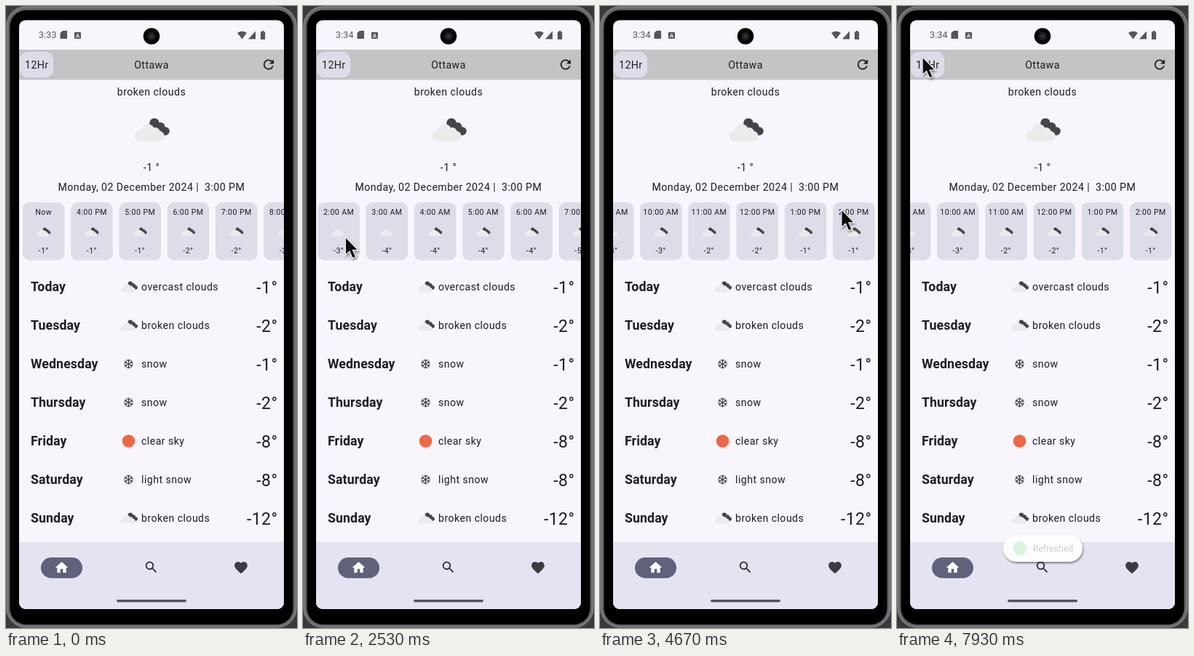
Recreate the animation shown at these times as an HTML page. Size 400 px wide and 855 px high, loop 8000 ms.

```html
<!DOCTYPE html>
<html lang="en">
<head>
<meta charset="utf-8">
<title>Weather</title>
<style>
html, body { margin: 0; width: 100%; height: 100%; overflow: hidden; background: #3a3a3c; }
svg { display: block; width: 100%; height: 100%; }
text { font: 14.16px Roboto, sans-serif; letter-spacing: .44px; fill: #1d1d22; }
.mid { text-anchor: middle; }
.small { font-size: 10.6px; }
.day { font-size: 17.7px; font-weight: 700; letter-spacing: .12px; }
.temp { font-size: 23px; text-anchor: end; }
.spin { fill: none; stroke: #050507; stroke-dasharray: 90 360; transform: rotate(var(--turn)); }
</style>
</head>
<body>
<svg id="stage" viewBox="0 0 400 855"></svg>
<script>
const LOOP = 8000, PITCH = 66.25;
const INK = '#1d1d22', DARK = '#454549', PALE = '#ebebec', STATUS = '#55555c';
const PAPER = '#f8f5fc', CARD = '#dddce9', NAV = '#e5e3f2', BAR = '#c4c3c5';

const icons = {
  home: 'M10 20v-6h4v6h5v-8h3L12 3 2 12h3v8z',
  search: 'M15.5 14h-.79l-.28-.27A6.47 6.47 0 0 0 16 9.5 6.5 6.5 0 1 0 9.5 16c1.61 0 3.09-.59 4.23-1.57l.27.28v.79l5 4.99L20.49 19l-4.99-5zm-6 0C7.01 14 5 11.99 5 9.5S7.01 5 9.5 5 14 7.01 14 9.5 11.99 14 9.5 14z',
  heart: 'M12 21.35l-1.45-1.32C5.4 15.36 2 12.28 2 8.5 2 5.42 4.42 3 7.5 3c1.74 0 3.41.81 4.5 2.09C13.09 3.81 14.76 3 16.5 3 19.58 3 22 5.42 22 8.5c0 3.78-3.4 6.86-8.55 11.54L12 21.35z',
  refresh: 'M17.65 6.35C16.2 4.9 14.21 4 12 4c-4.42 0-7.99 3.58-7.99 8s3.57 8 7.99 8c3.73 0 6.84-2.55 7.73-6h-2.08c-.82 2.33-3.04 4-5.65 4-3.31 0-6-2.69-6-6s2.69-6 6-6c1.66 0 3.14.69 4.22 1.78L13 11h7V4l-2.35 2.35z'
};

const text = (x, y, s, cls = '') => `<text x="${x}" y="${y}" class="${cls}">${s}</text>`;
const rect = (x, y, w, h, r, fill, more = '') =>
  `<rect x="${x}" y="${y}" width="${w}" height="${h}" rx="${r}" fill="${fill}" ${more}/>`;
const circle = (x, y, r, fill, more = '') => `<circle cx="${x}" cy="${y}" r="${r}" fill="${fill}" ${more}/>`;
const group = (x, y, body, scale = 1) => `<g transform="translate(${x} ${y}) scale(${scale})">${body}</g>`;
const icon = (name, x, y, fill) =>
  group(x, y, `<path d="${icons[name]}" fill="${fill}" transform="translate(-12 -12)"/>`, .885);
const spinner = (x, y, r, width) =>
  group(x, y, `<circle class="spin" r="${r}" pathLength="360" stroke-width="${width}"/>`);

function cloud(x, y, scale, dark = true) {
  const back = dark ? circle(4, -9, 6.8, DARK) + circle(12.5, -4, 6, DARK) + circle(19, 2, 5.8, DARK)
    + `<path d="M4-3 12 4 19 7.8H8z" fill="${DARK}"/>` : '';
  const front = circle(-5, 1.5, 9.3, PALE) + circle(-16, 8.5, 7.3, PALE) + circle(5, 3.5, 6.6, PALE)
    + circle(11, 9, 6.8, PALE) + rect(-17, 4, 29, 11.8, 2, PALE);
  return group(x, y, back + front, scale);
}

function snowflake(x, y) {
  let arms = '';
  for (let a = 0; a < 360; a += 60)
    arms += `<path d="M0 0V-6.6M-2.4-5.8 0-3.6 2.4-5.8" transform="rotate(${a})"/>`;
  return group(x, y, `<g fill="none" stroke="${DARK}" stroke-width="1.15">${arms}</g>`);
}

const hourLabel = i => {
  const h = (15 + i) % 24;
  return i ? `${h % 12 || 12}:00 ${h < 12 ? 'AM' : 'PM'}` : 'Now';
};
const hourTemps = [...'111223333333444455432211'];
const plainHours = [11, 12, 17, 18];
const cards = draw => hourTemps.map((t, i) => group(23 + i * PITCH, 270, draw(t, i))).join('');

const days = [
  ['Today', 'overcast clouds', 1], ['Tuesday', 'broken clouds', 2], ['Wednesday', 'snow', 1],
  ['Thursday', 'snow', 2], ['Friday', 'clear sky', 8], ['Saturday', 'light snow', 8], ['Sunday', 'broken clouds', 12]
];
const rows = draw => days.map((d, i) => group(0, 386 + i * 53, draw(...d))).join('');
const skyIcon = sky => sky.includes('cloud') ? cloud(169, 0, .48)
  : sky.includes('snow') ? snowflake(168.5, 0) : circle(168.5, 0, 8.8, '#ec6847');

const phone = rect(0, 0, 400, 855, 0, '#3a3a3c')
  + rect(1, 1, 398, 853, 26, '#6c6c6f', 'stroke="#98989b"')
  + rect(5, 5.5, 390, 845, 23, '#000', 'stroke="#4a4a4d"');

const statusBar = `<text id="clock" x="45" y="44" style="font-size:12.4px;letter-spacing:.2px;fill:${STATUS}"></text>
  <g fill="${STATUS}"><path d="M78 34h6v11h-9.500v-8z"/>${rect(94, 36, 9, 9, 1, STATUS)}
  <path d="M318 37q6.500-4.500 13 0l-6.500 8.500zM333 45.500h10v-11zM350 35.500h1.800V34h2.600v1.500h1.800v10.500h-6.200z"/></g>
  <path d="M96.300 43.500 98.500 38l2.200 5.500M97 42h3" fill="none" stroke="${PAPER}"/>`;

const header = rect(18, 60, 364, 41.5, 0, BAR) + rect(19, 63, 46, 35.5, 11, CARD)
  + text(26, 86, '12Hr') + text(200, 86, 'Ottawa', 'mid')
  + circle(361, 80, 17.5, '#707078', 'id="ripple"') + icon('refresh', 361, 80.5, INK);

const loaded = `<g id="loaded">${text(200, 123, 'broken clouds', 'mid')}${cloud(200, 170, 1)}
  ${text(200, 227, '-1 °', 'mid')}${text(71.5, 254, 'Monday, 02 December 2024 |&#160; 3:00 PM')}
  <g class="strip">${cards((t, i) => text(28.7, 17, hourLabel(i), 'mid small')
    + cloud(28.7, 40.5, .385, !plainHours.includes(i)) + text(28.7, 70, `-${t}°`, 'mid small'))}</g>
  ${rows((_, sky, t) => skyIcon(sky) + text(186, 5, sky) + text(373.5, 8.5, `-${t}°`, 'temp'))}</g>`;

const loading = `<g id="loading">${spinner(200, 170, 27.3, 5.5)}
  <g class="strip">${cards(() => spinner(28.5, 40, 10, 2.3))}</g>
  ${rows(() => spinner(168.5, 0, 13.3, 2.8))}</g>`;

const nav = rect(18, 737, 364, 92, 0, NAV) + rect(48, 758, 57, 28.5, 14.2, '#5f627a')
  + icon('home', 76.5, 772, '#fff') + icon('search', 199.7, 771.5, '#2b2b31') + icon('heart', 323, 772, '#3b3b43')
  + rect(152, 816, 96, 3.6, 1.8, '#55555c');

const toast = `<g id="toast">${rect(146, 727, 109, 37, 18.5, '#fdfcff', 'filter="url(#shadow)"')}
  <g id="toastBody">${circle(169, 745.5, 9.7, '#5fd66a')}
  <text x="187" y="750" style="font-size:12.2px;letter-spacing:0">Refreshed</text></g></g>`;

const pointer = `<path id="pointer" d="M0 0V24.500L5.600 19.500 9.800 29 14.200 27 10 18H17.500z"
  fill="#08080a" stroke="#f4f3f8" stroke-width="1.2" filter="url(#shadow)"/>`;

const stage = document.getElementById('stage');
stage.innerHTML = `<defs><clipPath id="screen">${rect(18, 19.4, 364, 809.6, 9, '#000')}</clipPath>
  <filter id="shadow" x="-50%" y="-50%" width="200%" height="200%">
  <feDropShadow dx="1" dy="2" stdDeviation="1.6" flood-opacity=".45"/></filter></defs>
  ${phone}<g clip-path="url(#screen)">${rect(18, 19, 364, 810, 0, PAPER)}
  ${statusBar}${header}
  <g class="strip">${cards(() => rect(0, 0, 57.5, 79.5, 9, CARD))}</g>
  ${loaded}${loading}${rows(day => text(34, 6, day, 'day'))}${nav}${toast}</g>
  ${circle(200, 41.5, 11.3, '#040405')}${circle(200, 41.5, 6, '#1b1c1f')}${circle(200, 41.5, 2.6, '#323438')}
  ${pointer}`;

// Key times, each followed by values; moves ease in and out between them.
const scrollKeys = [[750, 0], [1200, 295], [1560, 295], [1930, 559], [2250, 559],
  [2900, 990.75], [3050, 990.75], [3380, 1226.75]];
const pointerKeys = [[270, 402, 430], [650, 317, 332], [750, 317, 332], [1200, 22, 332], [1280, 22, 332],
  [1520, 295, 322], [1560, 295, 322], [1930, 31, 319], [1980, 31, 319], [2250, 310, 315], [2600, 30, 318],
  [2660, 30, 318], [2960, 319, 304], [3050, 319, 304], [3380, 83, 310], [3430, 83, 310], [3700, 329, 303],
  [4500, 329, 303], [5350, 357, 82], [6600, 357, 82], [7600, 35, 70]];

const clamp = v => Math.min(1, Math.max(0, v));
const ramp = (t, from, to) => clamp((t - from) / (to - from));

function sample(keys, t) {
  const next = keys.findIndex(k => k[0] > t);
  if (next < 0) return keys.at(-1).slice(1);
  if (next === 0) return keys[0].slice(1);
  const a = keys[next - 1], b = keys[next];
  const p = ramp(t, a[0], b[0]), eased = p * p * (3 - 2 * p);
  return a.slice(1).map((v, i) => v + (b[i + 1] - v) * eased);
}

const el = id => document.getElementById(id);
const strips = document.querySelectorAll('.strip');
const show = (id, opacity) => el(id).setAttribute('opacity', opacity);

function render(t) {
  const [scroll] = sample(scrollKeys, t);
  strips.forEach(s => s.setAttribute('transform', `translate(${-scroll} 0)`));
  el('pointer').setAttribute('transform', `translate(${sample(pointerKeys, t)})`);
  show('pointer', t < 270 ? 0 : 1);
  el('clock').textContent = t < 600 ? '3:33' : '3:34';

  const busy = t >= 5610 && t < 5860;
  show('loaded', busy ? 0 : 1);
  show('loading', busy ? 1 : 0);
  stage.style.setProperty('--turn', 180 + (t - 5670) * .36 + 'deg');
  show('ripple', .36 * ramp(t, 5450, 5560) * (1 - ramp(t, 5760, 5960)));

  show('toast', ramp(t, 5870, 5940) * (1 - ramp(t, 7950, 8000)));
  show('toastBody', ramp(t, 5920, 6200) * (1 - ramp(t, 7820, 7960)));
}

function tick(now) {
  render(now % LOOP);
  requestAnimationFrame(tick);
}
render(0);
requestAnimationFrame(tick);
</script>
</body>
</html>
```
